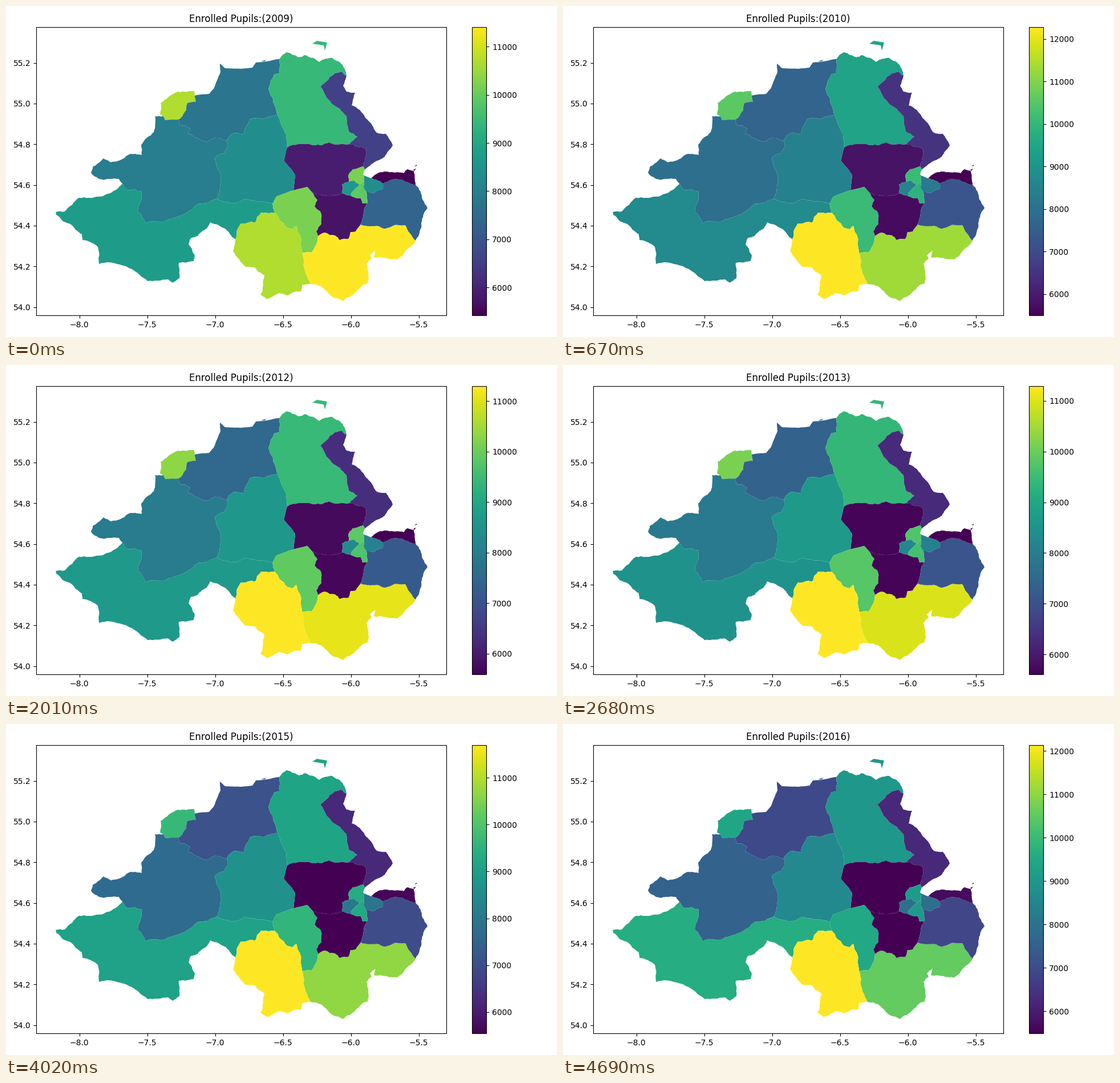
Animation, 966 px wide and 580 px high, one loop 7370 ms. Source, as a matplotlib script:

```python
import math
import random

import matplotlib.pyplot as plt
import numpy as np
from matplotlib.animation import FuncAnimation
from matplotlib.collections import PolyCollection
from matplotlib.ticker import MultipleLocator

WIDTH, HEIGHT, DPI = 966, 580, 100
LEFT, RIGHT, TOP, BOTTOM = 53.1, 771.9, 36.8, 542.4
FIRST_YEAR, LAST_YEAR, FRAMES = 2009, 2016, 11

plt.rcParams["font.family"] = "DejaVu Sans"

# Borders are keyed by the two regions they part; "_" stands for the outside.
borders = {}


def ragged(a, b, rng, rough):
    """Points from a up to b, each midpoint pushed sideways at random."""
    dx, dy = b[0] - a[0], b[1] - a[1]
    if math.hypot(dx, dy) < 5:
        return [a]
    push = rng.uniform(-rough, rough)
    mid = ((a[0] + b[0]) / 2 - push * dy, (a[1] + b[1]) / 2 + push * dx)
    return ragged(a, mid, rng, rough) + ragged(mid, b, rng, rough)


def border(key, *corners, rough=0.1):
    """Store a ragged line through a few corners in stage pixels."""
    rng = random.Random(key)
    line = []
    for a, b in zip(corners, corners[1:]):
        line += ragged(a, b, rng, rough)
    borders[key] = line + [corners[-1]]


def outline(region):
    """Join all borders of one region end to end."""
    pieces = [line for key, line in borders.items() if region in key]
    ring = list(pieces.pop(0))
    while pieces:
        piece = next(p for p in pieces if ring[-1] in (p[0], p[-1]))
        pieces.remove(piece)
        ring += (piece if piece[0] == ring[-1] else piece[::-1])[1:]
    return ring


def to_degrees(points):
    x, y = np.array(points, float).T
    return np.column_stack([-8 + (x - 128.6) / 238, 54 + (527.6 - y) / 356.7])


# North west
border("A_", (276, 193), (270, 190), (271, 170), (285, 159), (301, 150),
       (330, 149), (331, 157))
border("AG", (276, 193), (279, 200), (302, 199), rough=0.02)
border("AB", (331, 157), (333, 168), (318, 170), (316, 183), (302, 199))
border("B_", (331, 157), (356, 154), (364, 145), (376, 116), (375, 101),
       (384, 109), (412, 110), (432, 108), (438, 99), (479, 93), rough=0.03)
border("BC", (479, 93), (480, 118), (470, 120), (460, 145), (467, 160),
       (476, 191))
border("BF", (476, 191), (428, 198), (418, 224), (400, 222), (387, 236))
border("BG", (387, 236), (373, 231), (352, 238), (319, 224), (323, 215),
       (304, 208), (302, 199))
border("G_", (204, 311), (198, 303), (163, 303), (149, 292), (152, 282),
       (171, 267), (184, 274), (214, 261), (238, 261), (237, 243),
       (259, 221), (261, 193), (276, 193))
border("FG", (387, 236), (389, 247), (383, 258), (366, 266), (376, 296),
       (370, 337))
border("GH", (204, 311), (210, 321), (238, 324), (231, 360), (245, 381),
       (309, 366), (370, 337))

# North east
border("C_", (479, 93), (492, 81), (514, 90), (524, 86), (549, 98),
       (572, 91), (590, 103), (597, 122))
border("CD", (597, 122), (588, 115), (567, 125), (551, 141), (571, 171),
       (597, 193), (601, 220), (616, 229), (602, 242))
border("D_", (597, 122), (591, 140), (597, 150), (612, 152), (606, 174),
       (620, 182), (650, 222), (666, 224), (678, 244), (664, 264),
       (629, 287), rough=0.07)
border("DE", (602, 242), (630, 250), (629, 272), (626, 281))
border("CF", (476, 191), (491, 225), (493, 248), rough=0.05)
border("CE", (493, 248), (514, 242), (540, 244), (566, 239), (602, 242))
border("EF", (493, 248), (487, 271), (507, 296), (504, 323), rough=0.03)
border("EI", (504, 323), (528, 317), (537, 327), rough=0.03)
border("EL", (537, 327), (575, 332), (589, 328))

# City and the eastern peninsula
border("DO", (626, 281), (629, 287))
border("EO", (601, 308), (600, 298), (608, 286), (626, 281))
border("EP", (589, 328), (589, 313), (601, 308))
border("O_", (629, 287), (626, 295), (628, 297))
border("OP", (601, 308), (610, 306), (620, 313))
border("OQ", (620, 313), (628, 308))
border("OR", (628, 308), (628, 297))
border("PQ", (620, 313), (606, 327), (605, 333))
border("LP", (589, 328), (605, 333))
border("LQ", (605, 333), (622, 337), (625, 346), (633, 346))
border("QR", (628, 308), (627, 318), (632, 326))
border("MQ", (632, 326), (633, 346))
border("R_", (628, 297), (640, 302), rough=0)
border("NR", (640, 302), (661, 311))
border("MR", (632, 326), (645, 328), (661, 320), (661, 311))
border("MN", (661, 311), (693, 304), (718, 313))
border("N_", (640, 302), (650, 294), (676, 291), (697, 293), (704, 286),
       (715, 289), (718, 313))
border("M_", (718, 313), (730, 339), (739, 354), (728, 380), (718, 411))

# South
border("KM", (718, 411), (700, 384), (665, 390), (622, 383), (621, 384))
border("LM", (633, 346), (627, 363), (621, 384))
border("KL", (621, 384), (613, 395), (604, 396), (600, 408), (585, 410),
       (577, 402), (559, 397), (547, 403))
border("IL", (537, 327), (546, 340), (541, 351), (551, 360), (553, 382),
       (544, 395), (547, 403))
border("IK", (547, 403), (535, 432), (519, 432))
border("FI", (467, 347), (474, 334), (504, 323), rough=0.03)
border("HI", (467, 347), (471, 362))
border("IJ", (471, 362), (492, 388), (503, 391), (509, 385), (516, 404),
       (519, 432))
border("FH", (370, 337), (396, 346), (421, 338), (467, 347))
border("JK", (519, 432), (522, 444), (532, 482), (534, 487))
border("HJ", (402, 409), (412, 381), (437, 379), (447, 362), (471, 362))
border("J_", (534, 487), (519, 489), (517, 500), (492, 507), (478, 503),
       (456, 513), (446, 506), (453, 472), (436, 458), (420, 457),
       (398, 430), (402, 409))
border("K_", (718, 411), (686, 444), (645, 440), (648, 428), (638, 437),
       (641, 443), (632, 452), (634, 486), (614, 500), (590, 517),
       (552, 491), (534, 487))
border("H_", (402, 409), (388, 394), (358, 379), (336, 403), (325, 406),
       (320, 417), (331, 437), (329, 447), (303, 450), (304, 477),
       (292, 485), (284, 479), (248, 482), (200, 453), (163, 452),
       (161, 422), (134, 410), (133, 400), (88, 366), (87, 361), (103, 360),
       (128, 336), (163, 334), (204, 311))

ISLANDS = [
    ("C", [(537, 66), (545, 61), (563, 64), (559, 78), (557, 69)]),
    ("B", [(447, 97), (457, 94), (453, 97)]),
    ("N", [(714, 287), (719, 285), (716, 289)]),
    ("N", [(716, 281), (720, 278), (720, 280)]),
]

# Pupil counts at evenly spaced moments from the first to the last year.
COUNTS = {
    "A": (10690, 10270, 9410),
    "B": (7750, 7450, 6946),
    "C": (9431, 9430, 9010),
    "D": (6554, 6300, 6214),
    "E": (5895, 5690, 5482),
    "F": (8352, 8680, 8610),
    "G": (7930, 7980, 7545),
    "H": (8710, 8740, 8420, 9609),
    "I": (10210, 9850, 9476),
    "J": (10690, 12281, 10744, 11299, 11295, 11292, 11700, 12138),
    "K": (11409, 11040, 10540),
    "L": (5715, 5690, 5482),
    "M": (7333, 7150, 6880),
    "N": (5415, 5560, 5595, 5620, 5680),
    "O": (10210, 9830, 9143),
    "P": (8592, 8270, 7878),
    "Q": (9911, 9680, 9076),
    "R": (8352, 8080, 7878),
}


def pupils(region, year):
    keys = COUNTS[region]
    return np.interp(year, np.linspace(FIRST_YEAR, LAST_YEAR, len(keys)), keys)


def add_axes(left, right):
    return fig.add_axes([left / WIDTH, 1 - BOTTOM / HEIGHT,
                         (right - left) / WIDTH, (BOTTOM - TOP) / HEIGHT])


fig = plt.figure(figsize=(WIDTH / DPI, HEIGHT / DPI), dpi=DPI, facecolor="white")
ax = add_axes(LEFT, RIGHT)
ax.xaxis.set_major_locator(MultipleLocator(0.5))
ax.yaxis.set_major_locator(MultipleLocator(0.2))
(west, south), (east, north) = to_degrees([(LEFT, BOTTOM), (RIGHT, TOP)])
ax.set(xlim=(west, east), ylim=(south, north))
title = ax.set_title("")

shapes = [(region, outline(region)) for region in COUNTS] + ISLANDS
regions = PolyCollection([to_degrees(points) for _, points in shapes],
                         cmap="viridis", linewidths=0,
                         array=np.zeros(len(shapes)))
regions.set_clim(5000, 12000)
ax.add_collection(regions, autolim=False)
fig.colorbar(regions, cax=add_axes(817, 842.4), ticks=MultipleLocator(1000))


def update(frame):
    year = min(FIRST_YEAR + frame, LAST_YEAR)
    values = np.array([pupils(region, year) for region, _ in shapes])
    regions.set_array(values)
    regions.set_clim(values.min(), values.max())
    title.set_text(f"Enrolled Pupils:({year})")
    return regions, title


animation = FuncAnimation(fig, update, frames=FRAMES, interval=670, repeat=True)
plt.show()
```
